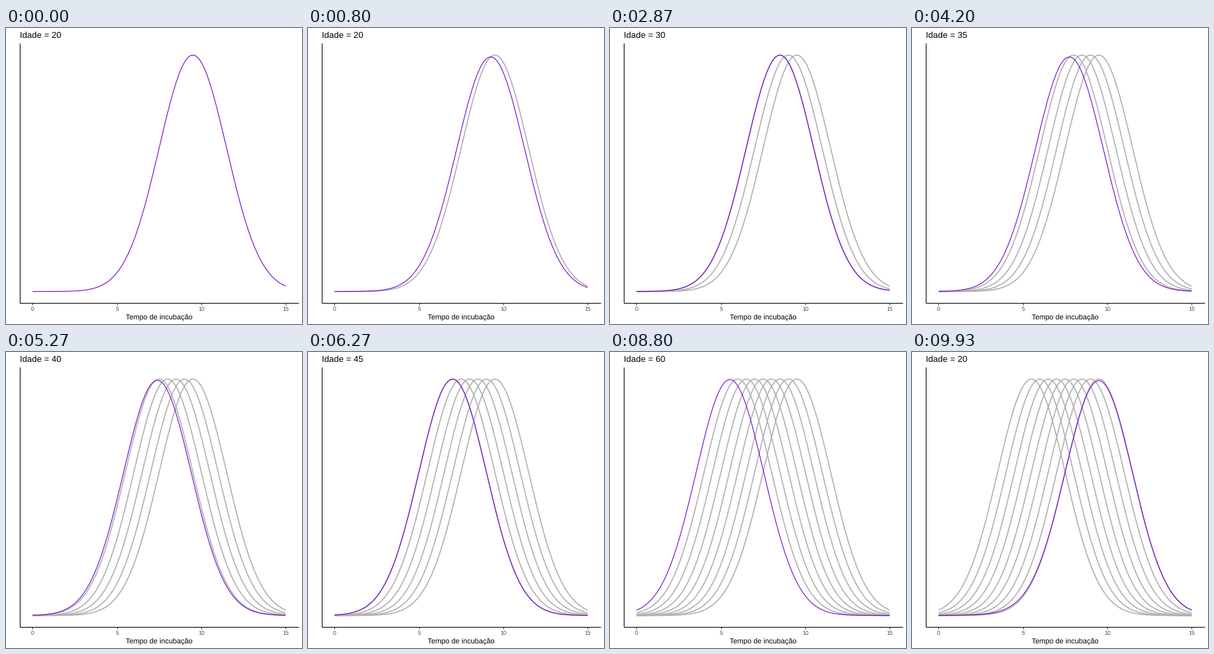
A matplotlib script that plays this animation: 450 px wide and 450 px high, repeating every 10 s.

```python
import numpy as np
import matplotlib.pyplot as plt
from matplotlib.animation import FuncAnimation

SIZE, DPI = 450, 72
LOOP_MS, TICK_MS = 10000, 20
POSES_PER_S = 15
MOVE = 8  # poses per transition
STARTS = [9, 26, 43, 60, 77, 94, 111, 127, 143]

LEFT, RIGHT, TOP, BOTTOM = 21, 444.5, 23, 418
BASE, PEAK = 400.6, 41.2
PURPLE, GREY = "#7200c4", "#b0b0b0"

plt.rcParams["font.family"] = "Liberation Sans"
plt.rcParams["text.hinting"] = "none"
plt.rcParams["lines.solid_capstyle"] = "butt"

ages = np.arange(20, 61, 5)
means = 9.5 - (ages - 20) / 10
days = np.linspace(0, 15, 201)
curves = np.exp(-((days - means[:, None]) ** 2) / 8)


def to_x(day):
    return 40.4 + day * 25.65


def to_y(density):
    return BASE - density * (BASE - PEAK)


def cubic_in_out(t):
    return 4 * t**3 if t < 0.5 else 1 - 4 * (1 - t) ** 3


fig = plt.figure(figsize=(SIZE / DPI, SIZE / DPI), dpi=DPI, facecolor="white")
ax = fig.add_axes([0, 0, 1, 1])
ax.set_xlim(0, SIZE)
ax.set_ylim(SIZE, 0)
ax.axis("off")

for day in (0, 5, 10, 15):
    x = to_x(day)
    ax.plot([x, x], [BOTTOM, 421.3], color="#333333", lw=1.07)
    ax.text(x, 430, str(day), size=8.8, color="#4d4d4d", ha="center")
ax.plot([LEFT, LEFT], [TOP, BOTTOM], color="black", lw=1.07)
ax.plot([LEFT, RIGHT], [BOTTOM, BOTTOM], color="black", lw=1.07)
ax.text((LEFT + RIGHT) / 2, 443.6, "Tempo de incubação", size=11, ha="center")
title = ax.text(21, 15, "", size=13.2)

trails = [ax.plot(to_x(days), to_y(c), color=GREY, lw=1.65)[0]
          for c in curves]
line, = ax.plot(to_x(days), to_y(curves[0]), color=PURPLE, lw=1.1)


def draw(tick):
    # a pose begins on the tick nearest to its time
    pose = int((tick + 0.7) * TICK_MS * POSES_PER_S / 1000)
    done = sum(pose >= s for s in STARTS)
    old, new, t = 0, 0, 1
    if done:
        old, new = done - 1, done % len(ages)
        t = min((pose - STARTS[old] + 1) / MOVE, 1)
    mix = cubic_in_out(t)
    line.set_ydata(to_y(curves[old] * (1 - mix) + curves[new] * mix))
    for i, trail in enumerate(trails):
        trail.set_visible(i < done)
    title.set_text(f"Idade = {ages[new if t > 0.5 else old]}")
    return [*trails, line, title]


anim = FuncAnimation(fig, draw, frames=LOOP_MS // TICK_MS, interval=TICK_MS,
                     repeat=True, repeat_delay=0, blit=False)
plt.show()
```
